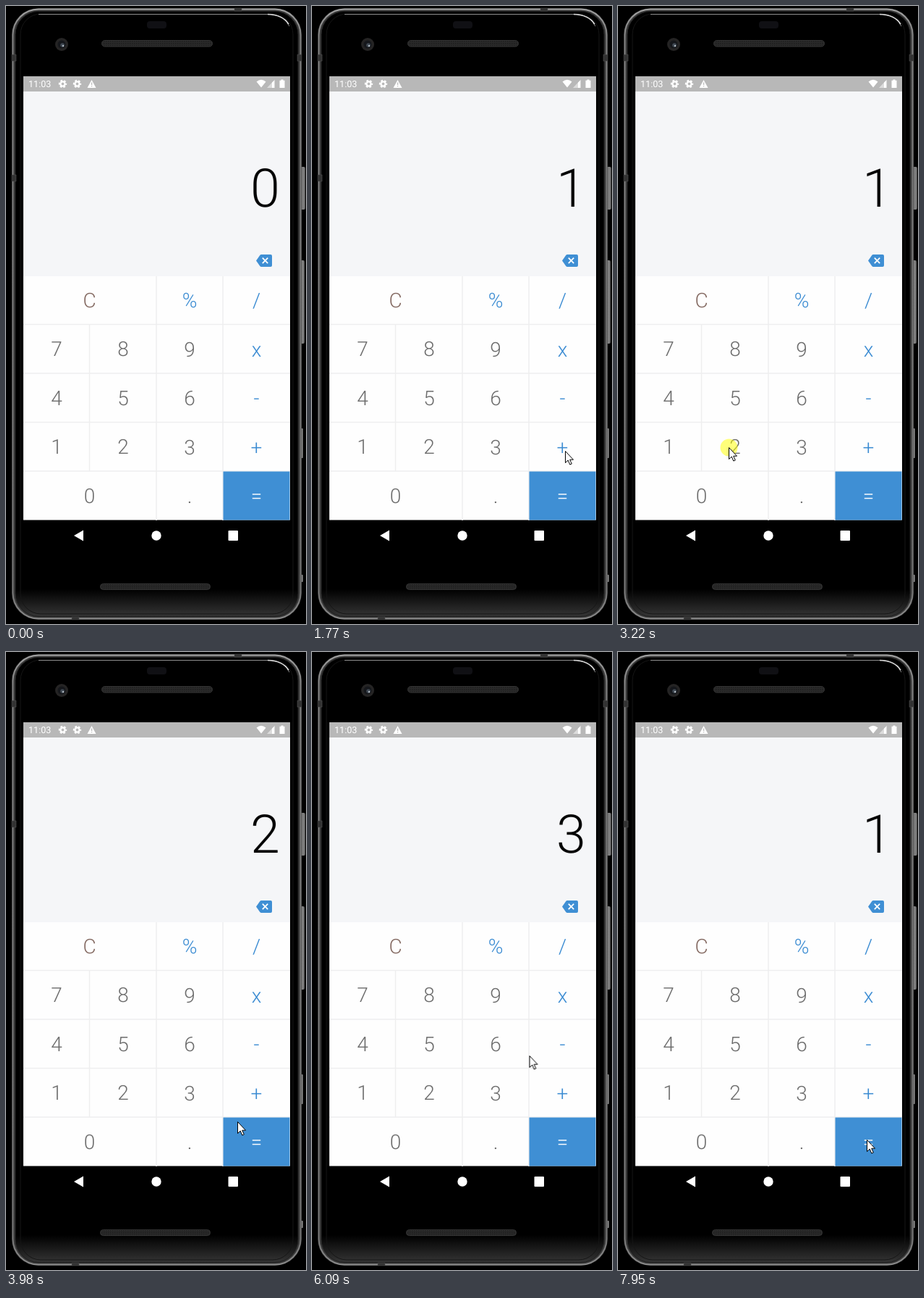
Animation of 415x853 px, one loop 8 s. Source, as an HTML page:

```html
<!DOCTYPE html>
<html lang="en">
<head>
<meta charset="utf-8">
<title>Calculator</title>
<style>
  html, body { margin: 0; width: 100%; height: 100%; overflow: hidden; background: #000; }
  svg { display: block; width: 415px; height: 853px; font-family: Roboto, sans-serif; text-rendering: geometricPrecision; }
  .keys { font-size: 28px; font-weight: 300; text-anchor: middle; fill: #6c6c6c; }
  .keys .op { fill: #3a8bd2; }
  .result { font-size: 73.5px; font-weight: 300; text-anchor: middle; }
  /* An invisible tilt keeps baselines off the pixel grid. */
  .keys, .result { transform: rotate(.01deg); transform-origin: 208px 540px; }
  .result text, .cursor, .halo { animation: 8s step-end infinite; }
  .result .zero { animation-name: zero; }
  .result .one { animation-name: one; }
  .result .two { animation-name: two; }
  .result .three { animation-name: three; }
  .cursor { animation-name: move; }
  .halo { animation-name: click; }

  @keyframes zero { 0% { opacity: 1 } 14.25%, 100% { opacity: 0 } }
  @keyframes one { 0%, 42% { opacity: 0 } 14.25%, 95%, 100% { opacity: 1 } }
  @keyframes two { 0%, 66.875%, 100% { opacity: 0 } 42% { opacity: 1 } }
  @keyframes three { 0%, 95%, 100% { opacity: 0 } 66.875% { opacity: 1 } }

  @keyframes click {
    0%, 14.25%, 24.75%, 42%, 66.875%, 95%, 100% { opacity: 0 }
    12.625%, 23%, 40.25%, 65.125%, 93.25% { opacity: 1 }
  }

  @keyframes move {
    0% { transform: translate(150px, 900px) }
    5.625% { transform: translate(150px, 838px); animation-timing-function: steps(3) }
    8.25% { transform: translate(100px, 680px); animation-timing-function: steps(3) }
    10.875% { transform: translate(67px, 602px); animation-timing-function: steps(2) }
    12.625% { transform: translate(65px, 594px) }
    14.25% { transform: translate(70px, 595px) }
    15.125% { transform: translate(98px, 599px); animation-timing-function: steps(4) }
    18.625% { transform: translate(332px, 622px) }
    20.375% { transform: translate(338px, 619px); animation-timing-function: steps(2) }
    22.125% { transform: translate(350px, 614px) }
    24.75% { transform: translate(344px, 614px); animation-timing-function: steps(6) }
    30% { transform: translate(135px, 614px) }
    31.625% { transform: translate(134px, 614px) }
    33.25% { transform: translate(137px, 613px); animation-timing-function: steps(6) }
    38.375% { transform: translate(153px, 609px) }
    44.625% { transform: translate(160px, 611px); animation-timing-function: steps(4) }
    48% { transform: translate(265px, 654px); animation-timing-function: steps(2) }
    49.75% { transform: translate(320px, 648px); animation-timing-function: steps(4) }
    53.25% { transform: translate(330px, 620px) }
    54.875% { transform: translate(333px, 619px) }
    59.875% { transform: translate(334px, 615px); animation-timing-function: steps(4) }
    63.375% { transform: translate(350px, 550px) }
    64.25% { transform: translate(350px, 546px) }
    73.625% { transform: translate(345px, 546px); animation-timing-function: steps(11) }
    83% { transform: translate(100px, 606px); animation-timing-function: steps(4) }
    86.375% { transform: translate(93px, 608px) }
    95% { transform: translate(93px, 608px); animation-timing-function: steps(2) }
    96.75% { transform: translate(170px, 628px); animation-timing-function: steps(3) }
    99.375%, 100% { transform: translate(344px, 673px) }
  }
</style>
</head>
<body>
<svg viewBox="0 0 415 853">
  <defs>
    <linearGradient id="rim" x2="0" y2="1">
      <stop offset="0" stop-color="#a2a2a2"/>
      <stop offset=".05" stop-color="#7c7c7c"/>
      <stop offset=".95" stop-color="#707070"/>
      <stop offset="1" stop-color="#8c8c8c"/>
    </linearGradient>
    <linearGradient id="glass" x2="0" y2="1">
      <stop offset=".955" stop-color="#000"/>
      <stop offset="1" stop-color="#353535"/>
    </linearGradient>
    <linearGradient id="button">
      <stop offset="0" stop-color="#444"/>
      <stop offset=".6" stop-color="#8a8a8a"/>
      <stop offset="1" stop-color="#555"/>
    </linearGradient>
    <pattern id="mesh" width="3" height="3" patternUnits="userSpaceOnUse">
      <rect width="3" height="3" fill="#292929"/>
      <rect width="1.5" height="1.5" fill="#1c1c1c"/>
    </pattern>
    <g id="gear" fill="none" stroke="#fff">
      <circle r="3.1" stroke-width="2.4"/>
      <circle r="4.8" stroke-width="1.8" stroke-dasharray="2.8 2.226" stroke-dashoffset="1.4"/>
    </g>
  </defs>

  <!-- Phone body -->
  <g fill="url(#button)">
    <rect x="407" y="222" width="7" height="59" rx="2"/>
    <rect x="407" y="351" width="6" height="115" rx="2"/>
    <rect x="407" y="583" width="4" height="41" rx="1"/>
    <rect x="407" y="785" width="4" height="10" rx="1"/>
  </g>
  <rect x="8" y="3" width="401" height="844" rx="37" fill="#444"/>
  <rect x="9.500" y="4.500" width="398" height="841" rx="35.500" fill="#3a3a3a" stroke="url(#rim)" stroke-width="2"/>
  <rect x="13" y="7.500" width="391" height="835" rx="32" fill="url(#glass)" stroke="#1c1c1c"/>
  <rect x="20" y="11" width="377" height="828" rx="28" fill="none" stroke="#161616"/>
  <path d="M45 11.500H366Q385 13 392 28" fill="none" stroke="#888"/>
  <path d="M362 11.500Q383 12 391 25" fill="none" stroke="#ddd" stroke-width="1.500"/>
  <path d="M8 67h6v9H8zM8 233h6v9H8zM403 67h6v9h-6zM316 3h10v4h-10zM91 843h10v4H91z" fill="#333" stroke="#555" stroke-width=".5"/>
  <rect x="195" y="21" width="27" height="10" rx="4" fill="#101014"/>
  <circle cx="77" cy="53" r="9" fill="#252424"/>
  <circle cx="77" cy="53" r="5.500" fill="#15171b"/>
  <circle cx="78" cy="54" r="2.800" fill="#414a54"/>
  <circle cx="79" cy="55" r="1.200" fill="#b8c0c8"/>
  <g fill="url(#mesh)" stroke="#353535">
    <rect x="132.500" y="47.500" width="153" height="8.500" rx="4.200"/>
    <rect x="130.500" y="797.500" width="152" height="8" rx="4"/>
  </g>

  <!-- Screen -->
  <rect x="24" y="97" width="369" height="612.500" fill="#fefefe"/>
  <rect x="24" y="118" width="369" height="255" fill="#f5f6f8"/>
  <rect x="24" y="97" width="369" height="21" fill="#b8b8b8"/>
  <g fill="#fff">
    <text x="31" y="112" font-size="12.600">11:03</text>
    <use href="#gear" x="78.500" y="107.500"/>
    <use href="#gear" x="98.500" y="107.500"/>
    <path d="M118.500 102l6 11h-12z"/>
    <path d="M118 105.500h1.200v3.500H118zM118 110h1.200v1.300H118z" fill="#b8b8b8"/>
    <path d="M346.500 104.500Q353 99 359.500 104.500L353 112.500z"/>
    <path d="M372 101.500V113H361z" opacity=".5"/>
    <path d="M368 105.700V113H361zM372 101.500V113h-1.200V102.800L361 113h11z"/>
    <path d="M380.500 101.500h3v1.200h2V113h-7v-10.300h2z"/>
  </g>
  <path d="M346 351.500l5.300-7.600q.7-.9 1.800-.9H366q2 0 2 2v13q0 2-2 2h-12.900q-1.100 0-1.800-.9z" fill="#3f8fd4"/>
  <path d="M354.800 347.700l7.400 7.400m0-7.400l-7.400 7.400" stroke="#fff" stroke-width="1.800"/>

  <g class="result">
    <text class="zero" x="358.500" y="276.500">0</text>
    <text class="one" x="358.500" y="276.500">1</text>
    <text class="two" x="358.500" y="276.500">2</text>
    <text class="three" x="358.500" y="276.500">3</text>
  </g>

  <path d="M24 439.500H393M24 507H393M24 574.500H393M24 642H393M115.500 440V642M208 373V710M300 373V710" stroke="#eeeeef" stroke-width="1.500"/>
  <rect x="300.500" y="642.500" width="92" height="67" fill="#3f8fd4"/>
  <g class="keys">
    <text x="115.500" y="416" fill="#846a62">C</text>
    <text x="70 162 254" y="483.500">789</text>
    <text x="70 162 254" y="551">456</text>
    <text x="70 162 254" y="618.500">123</text>
    <text x="115.500 254" y="686">0.</text>
    <text class="op" x="254 346.500" y="416">%/</text>
    <text class="op" x="346.500" y="483.500">x</text>
    <text class="op" x="346.500" y="551">-</text>
    <text class="op" x="346.500" y="618.500">+</text>
    <text x="346.500" y="686" fill="#fff">=</text>
  </g>

  <g fill="#fff">
    <path d="M94 731l13-7.500v15z"/>
    <circle cx="208" cy="731" r="6.700"/>
    <rect x="307.500" y="724" width="13.500" height="14" rx="1"/>
  </g>

  <g class="cursor">
    <circle class="halo" cx=".5" cy=".5" r="12" fill="#ff0" fill-opacity=".52"/>
    <path d="M.5 .5V16.500L4.200 13l2.600 6 2.500-1.100-2.600-5.700h4.800z" fill="#fff" stroke="#000"/>
  </g>
</svg>
</body>
</html>
```
